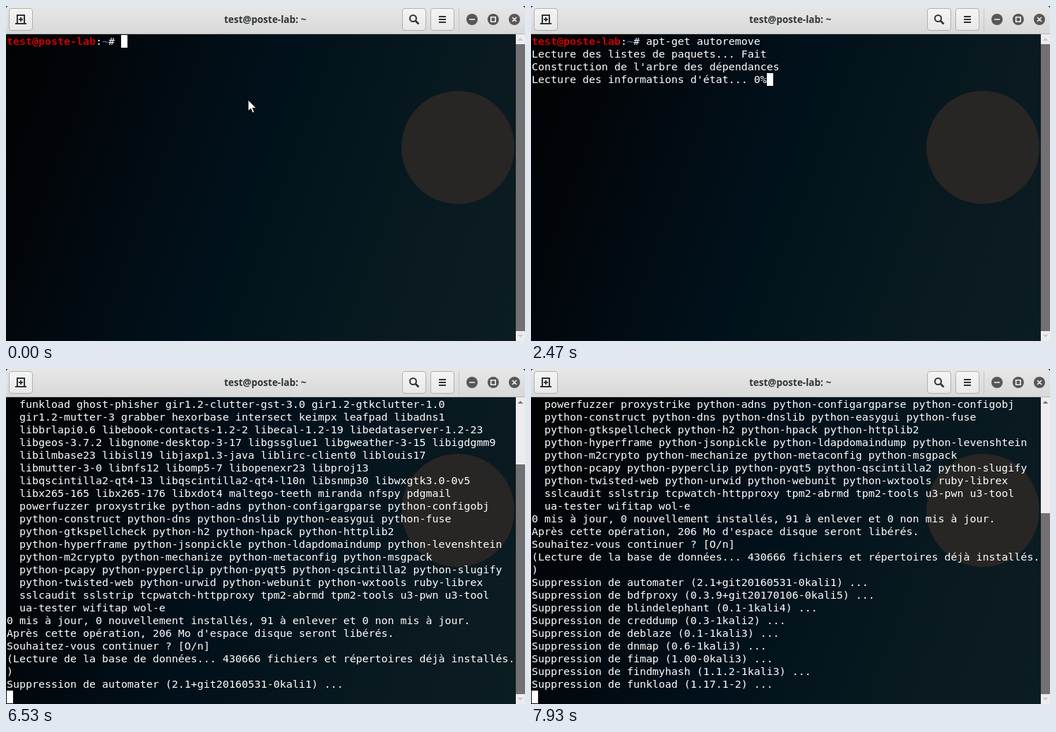
Write an HTML page that moves like this. It is 735 px wide and 474 px high and loops after 8 s.

```html
<!DOCTYPE html>
<html lang="fr">
<head>
<meta charset="utf-8">
<title>Terminal</title>
<style>
html, body { margin: 0; width: 100%; height: 100%; overflow: hidden; background: #000; }
#stage { position: relative; width: 735px; height: 474px; overflow: hidden; }
#stage > * { position: absolute; }
#wall { left: 0; top: 40px; width: 722px; height: 434px;
  background: linear-gradient(110deg, #010203, #02060b 16%, #01111b 46%, #08181f 72%, #0c1d22); }
#disc { left: 560px; top: 120px; width: 160px; height: 160px; border-radius: 50%; background: #272625; }
#bar { left: 0; top: 0; width: 735px; height: 40px; }
#title { left: 0; top: 0; width: 734px; line-height: 38px; text-align: center;
  font: 700 13.5px/38px "Noto Sans", sans-serif; color: #2e3436; }
#screen, #cursor { margin: 0; font: 14.95px/18px "DejaVu Sans Mono", monospace; white-space: pre; }
#screen { left: 1px; top: 41px; color: #fff; }
#screen b:first-child { color: #c00; }
#screen b { color: #3465a4; }
#cursor { width: 9px; height: 18px; background: #fff; color: #000; }
#cursor.hollow { background: none; box-shadow: inset 0 0 0 1px #fff; }
#scroll { left: 722px; top: 40px; width: 13px; height: 434px; background: #ededed; }
#thumb { left: 722px; width: 13px; bottom: 14px; background: #717171; }
#arrows { left: 722px; top: 40px; }
#menu { left: 295px; top: 86px; width: 235px; height: 230px; box-sizing: border-box; padding: 2px 0;
  border: 1px solid #bcbcbc; background: #fff; color: #2e3436; font: 13.5px/29px "Noto Sans", sans-serif; }
#menu div { height: 29px; padding-left: 28px; }
#menu .off { color: #929595; }
#menu .hot { background: #4a90d9; color: #fff; }
#menu hr { margin: 3px 0; border: 0; height: 1px; background: #dcdcdc; }
#pointer { left: 0; top: 0; overflow: visible; }
</style>
</head>
<body>
<div id="stage">
  <div id="wall"></div>
  <div id="disc"></div>
  <svg id="bar" viewBox="0 0 735 40">
    <defs>
      <linearGradient id="head" x2="0" y2="1"><stop stop-color="#e7e7e7"/><stop offset="1" stop-color="#d8d8d8"/></linearGradient>
      <linearGradient id="btn" x2="0" y2="1"><stop stop-color="#f5f5f5"/><stop offset="1" stop-color="#e8e8e8"/></linearGradient>
    </defs>
    <path fill="url(#head)" d="M0 40V4Q0 0 4 0H731Q735 0 735 4V40z"/>
    <path stroke="#b5b5b5" d="M0 39.5H735"/>
    <path stroke="#c6c6c6" d="M641.5 3V36"/>
    <g fill="url(#btn)" stroke="#b0b0b0">
      <rect x="4.5" y="3.5" width="33" height="31" rx="3.5"/>
      <rect x="561.5" y="3.5" width="33" height="31" rx="3.5"/>
      <rect x="601.5" y="3.5" width="33" height="31" rx="3.5"/>
    </g>
    <g fill="none" stroke="#2e3436" stroke-width="2">
      <path d="M13 25H16V13H26V25H29M18 19H24M21 16V22M15 25H27"/>
      <circle cx="576.5" cy="17.5" r="4.5"/>
      <path d="M579.5 20.5L584.5 25.5" stroke-width="2.6"/>
      <path d="M613 15H623M613 19H623M613 23H623"/>
    </g>
    <g fill="#555759">
      <circle cx="660" cy="19" r="8"/><circle cx="690" cy="19" r="8"/><circle cx="720" cy="19" r="8"/>
    </g>
    <path fill="none" stroke="#f2f2f2" stroke-width="1.6" d="M656 19H664M686.8 15.8H693.2V22.2H686.8zM717 16L723 22M723 16L717 22"/>
  </svg>
  <div id="title">test@poste-lab: ~</div>
  <pre id="screen"></pre>
  <div id="cursor"></div>
  <div id="scroll"></div>
  <div id="thumb"></div>
  <svg id="arrows" width="13" height="434">
    <path fill="#ededed" d="M0 0H13V14H0zM0 420H13V434H0z"/>
    <path id="up" d="M2.5 9L6.5 5L10.5 9z"/>
    <path fill="#c9c9c9" d="M2.5 425L6.5 429L10.5 425z"/>
  </svg>
  <div id="menu">
    <div class="off">Copier</div>
    <div class="off">Copier au format HTML</div>
    <div>Coller</div>
    <hr><div>Lecture seule</div>
    <hr><div>Profils</div>
    <hr><div>Plein écran</div>
    <div>Afficher la barre de menus</div>
  </div>
  <svg id="pointer" width="1" height="1">
    <path id="arrow" fill="#fff" stroke="#111" stroke-width=".8" d="M0 0V15.5L3.6 12.2L6.2 18L8.6 17L6.1 11.3H11z"/>
    <g id="beam" fill="none">
      <path stroke="#000" stroke-width="3.4" d="M-2.5-4H2.5M0-4V4M-2.5 4H2.5"/>
      <path stroke="#fff" stroke-width="1.6" d="M-2.5-4H2.5M0-4V4M-2.5 4H2.5"/>
    </g>
  </svg>
</div>
<script>
const LOOP = 8000, ROWS = 24, BLINK = 600;
const PROMPT = 'test@poste-lab:~# ', COMMAND = PROMPT + 'apt-get autoremove';
const READING = '(Lecture de la base de données... ';
const ASK = 'Souhaitez-vous continuer ? [O/n] ';

const packages = `automater bdfproxy blindelephant creddump deblaze dnmap fimap findmyhash
funkload ghost-phisher gir1.2-clutter-gst-3.0 gir1.2-gtkclutter-1.0
gir1.2-mutter-3 grabber hexorbase intersect keimpx leafpad libadns1
libbrlapi0.6 libebook-contacts-1.2-2 libecal-1.2-19 libedataserver-1.2-23
libgeos-3.7.2 libgnome-desktop-3-17 libgssglue1 libgweather-3-15 libigdgmm9
libilmbase23 libisl19 libjaxp1.3-java liblirc-client0 liblouis17
libmutter-3-0 libnfs12 libomp5-7 libopenexr23 libproj13
libqscintilla2-qt4-13 libqscintilla2-qt4-l10n libsnmp30 libwxgtk3.0-0v5
libx265-165 libx265-176 libxdot4 maltego-teeth miranda nfspy pdgmail
powerfuzzer proxystrike python-adns python-configargparse python-configobj
python-construct python-dns python-dnslib python-easygui python-fuse
python-gtkspellcheck python-h2 python-hpack python-httplib2
python-hyperframe python-jsonpickle python-ldapdomaindump python-levenshtein
python-m2crypto python-mechanize python-metaconfig python-msgpack
python-pcapy python-pyperclip python-pyqt5 python-qscintilla2 python-slugify
python-twisted-web python-urwid python-webunit python-wxtools ruby-librex
sslcaudit sslstrip tcpwatch-httpproxy tpm2-abrmd tpm2-tools u3-pwn u3-tool
ua-tester wifitap wol-e`.split('\n').map(s => '  ' + s);

const removed = ['automater (2.1+git20160531-0kali1)', 'bdfproxy (0.3.9+git20170106-0kali5)',
  'blindelephant (0.1-1kali4)', 'creddump (0.3-1kali2)', 'deblaze (0.1-1kali3)', 'dnmap (0.6-1kali3)',
  'fimap (1.00-0kali3)', 'findmyhash (1.1.2-1kali3)', 'funkload (1.17.1-2)'
].map(s => `Suppression de ${s} ...`);

const log = [COMMAND, 'Lecture des listes de paquets... Fait', "Construction de l'arbre des dépendances",
  "Lecture des informations d'état... Fait", 'Les paquets suivants seront ENLEVÉS :', ...packages,
  '0 mis à jour, 0 nouvellement installés, 91 à enlever et 0 non mis à jour.',
  "Après cette opération, 206 Mo d'espace disque seront libérés.", ASK,
  READING + '430666 fichiers et répertoires déjà installés.', ')', ...removed];

// [time, finished lines, text on the current line, cursor column]
const steps = [
  [0, 0, PROMPT], [1330, 0, COMMAND], [1930, 1, ''],
  [2000, 1, 'Lecture des listes de paquets... 0%'], [2130, 2, ''],
  [2200, 2, log[2] + ' 50%'], [2470, 3, "Lecture des informations d'état... 0%"],
  [2600, 25, ASK], [4070, 26, ''],
  ...[[5530, 55], [5730, 70], [5800, 85], [5930, 95]].map(([t, p]) => [t, 26, READING + p + '%', 0]),
  ...[6330, 6400, 6930, 7330, 7470, 7600, 7670, 7730, 7870, 7930].map((t, i) => [t, 28 + i, ''])
];
const keyTimes = [0, 1330, 1930, 4070];

const el = id => document.getElementById(id);
const show = (id, on) => el(id).style.visibility = on ? 'visible' : 'hidden';
const items = [...document.querySelectorAll('#menu div')];
const colour = s => s.replace('test@poste-lab:~', '<b>test@poste-lab</b>:<b>~</b>');
let drawn;

function drawText(step) {
  const [, done, text, col = text.length] = step;
  const total = Math.max(ROWS, done + 1), top = total - ROWS;
  el('screen').innerHTML = [...log.slice(top, done), text].map(colour).join('\n');
  const cursor = el('cursor');
  cursor.style.left = 1 + 9 * col + 'px';
  cursor.style.top = 41 + 18 * (done - top) + 'px';
  cursor.textContent = text[col] || '';
  el('thumb').style.top = 54 + Math.round(406 * top / total) + 'px';
  el('up').setAttribute('fill', top ? '#777' : '#c9c9c9');
}

function glide(t, start, end, from, to) {
  const p = Math.min(1, Math.max(0, (t - start) / (end - start)));
  return from.map((v, i) => Math.round(v + (to[i] - v) * p));
}

function drawPointer(t, menu) {
  const arrow = t < 70 || menu;
  const [x, y] = t < 70 ? [343, 133]
    : t < 530 ? glide(t, 10, 200, [344, 134], [294, 86])
    : menu ? glide(t, 740, 1130, [295, 88], [353, 151])
    : [354, 152];
  el('pointer').style.transform = `translate(${x}px, ${y}px)`;
  show('arrow', arrow);
  show('beam', !arrow && t < 1930);
  const hot = menu && t >= 800 ? Math.floor((y - 89) / 29) : -1;
  items.forEach((item, i) => item.classList.toggle('hot', i === hot));
}

function draw(t) {
  const step = steps.findLast(s => s[0] <= t);
  if (step !== drawn) drawText(drawn = step);
  const menu = t >= 530 && t < 1330;
  const sinceKey = t - keyTimes.findLast(k => k <= t);
  show('menu', menu);
  show('cursor', menu || Math.floor(sinceKey / BLINK) % 2 === 0);
  el('cursor').classList.toggle('hollow', menu);
  drawPointer(t, menu);
}

const begin = performance.now();
function tick() {
  draw((performance.now() - begin) % LOOP);
  requestAnimationFrame(tick);
}
tick();
</script>
</body>
</html>
```
